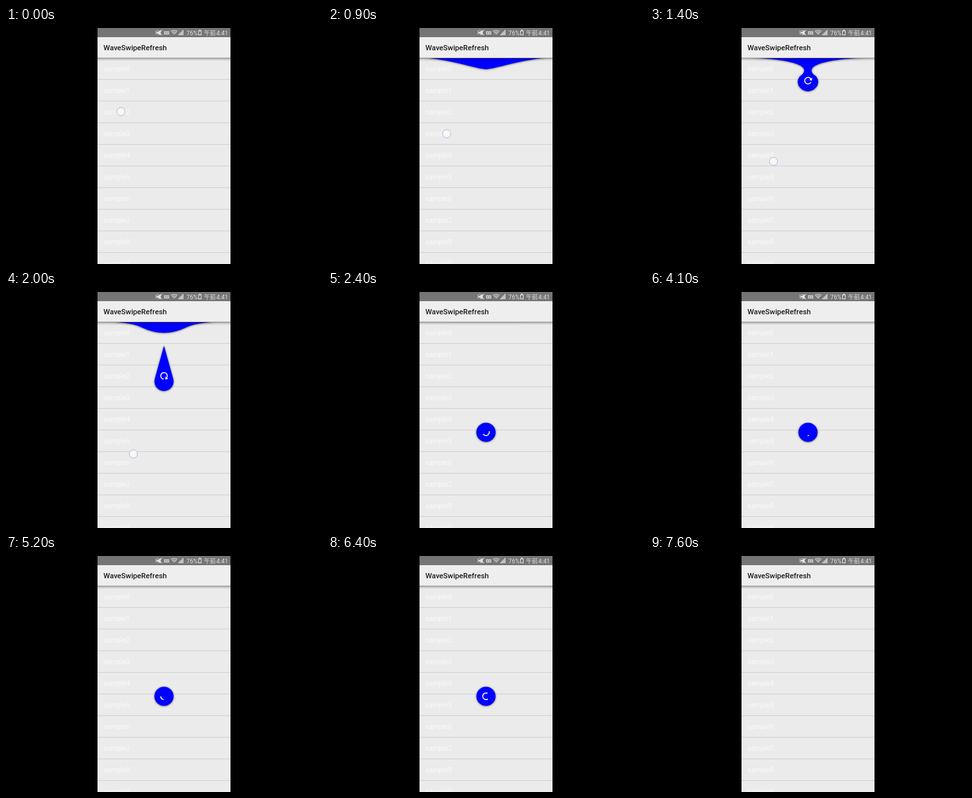
An HTML page with a canvas for the animation above (7.9 s loop, 480 by 360 pixels).

```html
<!DOCTYPE html>
<html>
<head>
<meta charset="utf-8">
<style>
html, body { margin: 0; width: 100%; height: 100%; overflow: hidden; background: #000; }
canvas { display: block; }
</style>
</head>
<body>
<canvas id="stage" width="480" height="360"></canvas>
<script>
const ctx = document.getElementById('stage').getContext('2d');
const LOOP = 7900, STEP = 100;
const LEFT = 139, WIDTH = 202, TOP = 45, CX = 240, REST = 214, RADIUS = 14.5;
const DROP = 1737, RELEASE = 2170, SPIN = 2840, CYCLE = 1365, VANISH = 7170;
const BLUE = '#00f';

// Left half of the wave outline, in units of the screen width
const FLAT = [[.1655, 0], [.4188, -.0109], [.4606, -.0049], [.4893, 0], [.4893, 0], [.5, 0]];
const BUMP = FLAT.map(([x, y], i) => [x, i ? y + .1 : y]);
const NECK = [[.1655, 0], [.5237, .0553], [.4557, .0936], [.3908, .1302], [.4303, .2173], [.5, .2173]];
const BULB = [[.1655, 0], [.5909, 0], [.4557, .1642], [.3941, .2061], [.4303, .2889], [.5, .2889]];

const clamp = v => Math.max(0, Math.min(1, v));
const lerp = (a, b, k) => a + (b - a) * k;
const part = (t, from, to) => clamp((t - from) / (to - from));
const rad = deg => deg * Math.PI / 180;
const smooth = k => (1 - Math.cos(Math.PI * k)) / 2;

function fastOutSlowIn(x) {
  let lo = 0, hi = 1;
  for (let i = 0; i < 20; i++) {
    const s = (lo + hi) / 2, r = 1 - s;
    if (1.2 * r * r * s + .6 * r * s * s + s ** 3 < x) lo = s; else hi = s;
  }
  return lo * lo * (3 - 2 * lo);
}

function bounce(k) {
  k *= 1.1226;
  if (k < .3535) return 8 * k * k;
  if (k < .7408) return 8 * (k - .54719) ** 2 + .7;
  if (k < .9644) return 8 * (k - .8526) ** 2 + .9;
  return 8 * (k - 1.0435) ** 2 + .95;
}

function text(str, x, y, font, color) {
  ctx.font = font;
  ctx.fillStyle = color;
  ctx.fillText(str, x, y);
}

function rect(x, y, w, h, color) {
  ctx.fillStyle = color;
  ctx.fillRect(x, y, w, h);
}

function line(color, width, ...points) {
  ctx.strokeStyle = color;
  ctx.lineWidth = width;
  ctx.beginPath();
  points.forEach(p => ctx.lineTo(...p));
  ctx.stroke();
}

function fillBlue() {
  ctx.save();
  ctx.shadowColor = 'rgba(0,0,0,.65)';
  ctx.shadowBlur = 3;
  ctx.shadowOffsetY = .5;
  ctx.fillStyle = BLUE;
  ctx.fill();
  ctx.restore();
}

function drawList() {
  rect(LEFT, 0, WIDTH, 360, '#ebebeb');
  for (let i = 0; i < 10; i++) {
    text('sample' + i, 148, 66 + 33 * i, '10.5px Roboto, sans-serif', '#f9f9f9');
    rect(LEFT, 78 + 33 * i, WIDTH, 1, '#d2d2d2');
  }
}

function drawStatus() {
  const ink = '#e2e2e2';
  rect(LEFT, 0, WIDTH, 14, '#757575');
  // muted speaker
  line(ink, 1, [228, 4], [228, 10]);
  ctx.fillStyle = ink;
  ctx.beginPath();
  [[229, 6], [231, 6], [235, 3], [235, 11], [231, 8.5], [229, 8.5]].forEach(p => ctx.lineTo(...p));
  ctx.fill();
  line(ink, 1, [230, 3], [237, 11]);
  line(ink, 1, [237, 3], [231, 11]);
  // badge
  rect(240, 5, 8, 5, '#c9c9c9');
  rect(241.5, 6.5, 2, 2, '#858585');
  rect(245, 6.5, 1.5, 2, '#858585');
  // wireless
  ctx.strokeStyle = ink;
  ctx.lineWidth = 1.2;
  for (const r of [2.5, 5, 7.5]) {
    ctx.beginPath();
    ctx.arc(255.5, 11, r, rad(-130), rad(-50));
    ctx.stroke();
  }
  for (let i = 0; i < 4; i++) rect(262 + 2 * i, 9 - 2 * i, 1.4, 2 + 2 * i, ink);
  text('76%', 274, 10.5, '9.2px Roboto, sans-serif', ink);
  ctx.strokeStyle = ink;
  ctx.lineWidth = 1;
  ctx.strokeRect(292.5, 4.5, 4, 6);
  rect(293.5, 2.5, 2, 1.5, ink);
  text('午前', 301, 10.5, '8.8px "Noto Sans CJK JP", "Noto Sans CJK", sans-serif', ink);
  text('4:41', 319.5, 10.5, '9.2px Roboto, sans-serif', ink);
}

function drawToolbar() {
  const shade = ctx.createLinearGradient(0, 46, 0, 51);
  shade.addColorStop(0, 'rgba(0,0,0,.36)');
  shade.addColorStop(.4, 'rgba(0,0,0,.1)');
  shade.addColorStop(1, 'rgba(0,0,0,0)');
  rect(LEFT, 46, WIDTH, 5, shade);
  rect(LEFT, 14, WIDTH, 32, '#eee');
  rect(LEFT, 45, WIDTH, 1, '#b5b5b5');
  text('WaveSwipeRefresh', 148, 34, '500 11.2px Roboto, sans-serif', '#1c1c1c');
}

const mix = (a, b, k) => a.map((p, i) => [lerp(p[0], b[i][0], k), lerp(p[1], b[i][1], k)]);

function pullPose(t) {
  if (t < 950) return mix(FLAT, BUMP, part(t, 520, 950));
  if (t < 1250) return mix(BUMP, NECK, part(t, 950, 1250));
  return mix(NECK, BULB, part(t, 1250, 1540));
}

function drawPull(pose) {
  const left = pose.flatMap(([x, y]) => [LEFT + x * WIDTH, TOP + y * WIDTH]);
  const right = [...pose].reverse().flatMap(([x, y]) => [LEFT + (1 - x) * WIDTH, TOP + y * WIDTH]);
  ctx.beginPath();
  ctx.moveTo(LEFT, TOP);
  ctx.bezierCurveTo(...left.slice(0, 6));
  ctx.bezierCurveTo(...left.slice(6));
  ctx.bezierCurveTo(...right.slice(2, 8));
  ctx.bezierCurveTo(...right.slice(8), LEFT + WIDTH, TOP);
  ctx.closePath();
  fillBlue();
}

function drawRebound(t) {
  const h = 60 * (1 - bounce(part(t, DROP, DROP + 1000)));
  if (h < .3) return;
  const at = (x, y) => [LEFT + x * WIDTH, TOP + y * h];
  ctx.beginPath();
  ctx.moveTo(LEFT, TOP);
  ctx.quadraticCurveTo(...at(.25, 0), ...at(.333, .5));
  ctx.quadraticCurveTo(...at(.5, 1.4), ...at(.666, .5));
  ctx.quadraticCurveTo(...at(.75, 0), ...at(1, 0));
  ctx.closePath();
  fillBlue();
}

const dropY = t => lerp(TOP, REST, smooth(part(t, DROP, DROP + 500)));

function drawDrop(t, scale) {
  const y = dropY(t), r = RADIUS * scale;
  const tip = lerp(TOP, REST - RADIUS, smooth(part(t, DROP + 100, DROP + 600)));
  const landed = part(t, DROP + 500, DROP + 1000);
  const squash = .12 * Math.sin(landed * Math.PI * 3) * (1 - landed);
  const half = y - tip > r ? Math.acos(r / (y - tip)) : 0;
  ctx.save();
  ctx.translate(CX, y);
  ctx.scale(1 + squash, 1 - squash);
  ctx.beginPath();
  if (half && scale === 1) ctx.moveTo(0, tip - y);
  ctx.arc(0, 0, r, half - Math.PI / 2, Math.PI * 1.5 - half);
  ctx.closePath();
  fillBlue();
  ctx.restore();
}

// Start and end of the progress arc in degrees
function ringArc(t) {
  if (t < RELEASE) {
    const end = -35 + (t - 1400) * 70 / 600;
    return [end - 288, end];
  }
  if (t < SPIN) {
    const k = part(t, RELEASE, SPIN), end = lerp(55, 302, k);
    return [end - 288 * (1 - fastOutSlowIn(k)), end];
  }
  const turns = (t - SPIN) / CYCLE, n = Math.floor(turns), k = turns - n;
  const base = -58 + 146 * n + 234 * k;
  return [
    base + 288 * fastOutSlowIn(clamp(2 * k - 1)),
    base + 272 * fastOutSlowIn(clamp(2 * k))
  ];
}

function drawRing(t, y, scale, alpha) {
  let [from, to] = ringArc(t);
  if (to < from + 4) to = from + 4;
  ctx.save();
  ctx.globalAlpha = alpha;
  ctx.translate(CX, y);
  ctx.scale(scale, scale);
  ctx.strokeStyle = ctx.fillStyle = '#fff';
  ctx.lineWidth = 1.5;
  ctx.lineCap = 'square';
  ctx.beginPath();
  ctx.arc(0, 0, 5, rad(from), rad(to));
  ctx.stroke();
  if (t < RELEASE) {
    ctx.rotate(rad(to));
    ctx.beginPath();
    ctx.moveTo(2, 0);
    ctx.lineTo(8, 0);
    ctx.lineTo(5, 3.2);
    ctx.fill();
  }
  ctx.restore();
}

function drawTouch(t) {
  if (t >= RELEASE) return;
  const a = part(t, 500, 1400), b = Math.max(0, (t - 1400) / 600);
  ctx.beginPath();
  ctx.arc(174.5 + 13 * a + 6 * b, 127.5 + 76 * a + 43.5 * b, 6.2, 0, 7);
  ctx.fillStyle = 'rgba(248,248,251,.95)';
  ctx.fill();
  ctx.strokeStyle = '#b9b9cf';
  ctx.lineWidth = 1;
  ctx.stroke();
}

function draw(t) {
  rect(0, 0, 480, 360, '#000');
  ctx.save();
  ctx.beginPath();
  ctx.rect(LEFT, 0, WIDTH, 360);
  ctx.clip();
  drawList();
  const scale = 1 - part(t, VANISH, VANISH + 200);
  if (t >= DROP) {
    drawRebound(t);
    if (scale) {
      drawDrop(t, scale);
      drawRing(t, dropY(t - 16), scale, 1);
    }
  } else if (t >= 600) {
    const pose = pullPose(t);
    drawPull(pose);
    drawRing(t, TOP + pose[5][1] * WIDTH - 16, 1, part(t, 900, 1200));
  }
  drawToolbar();
  drawStatus();
  drawTouch(t);
  ctx.restore();
}

function tick() {
  draw(Math.floor(performance.now() % LOOP / STEP) * STEP);
  requestAnimationFrame(tick);
}
tick();
</script>
</body>
</html>
```
